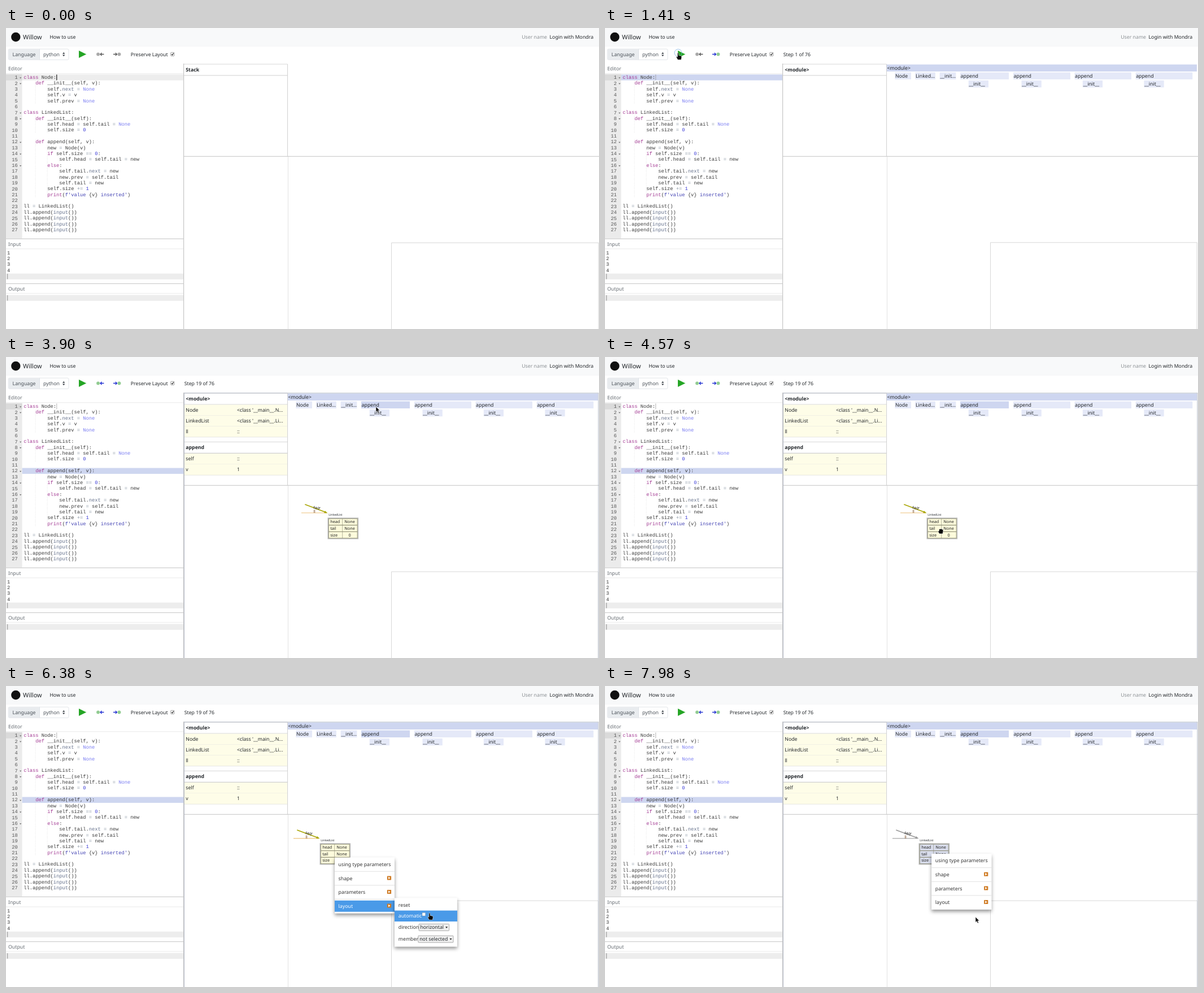
Write an HTML page that moves like this. It is 1050 by 533 pixels and loops after 8 s.

```html
<!DOCTYPE html>
<html lang="en">
<head>
<meta charset="utf-8">
<title>Program visualizer</title>
<style>
html, body { margin: 0; width: 100%; height: 100%; overflow: hidden; background: #fff; }
svg { display: block; width: 1050px; height: 533px; }
text { font-family: "Noto Sans", sans-serif; white-space: pre; text-rendering: geometricPrecision; }
.mono { font-family: "Liberation Mono", monospace; }
.bold { font-weight: 700; }
</style>
</head>
<body>
<svg id="stage" viewBox="0 0 1050 533" xmlns="http://www.w3.org/2000/svg"></svg>
<script>
const LOOP = 8000, EM = 8.75, ROW = 10.385, CODE_TOP = 82.3;
const INK = '#212529', BLUE = '#ced6f0', PALE = '#e5e9f8', EDGE = '#cfcfcf', HOT = '#4a9ae8';

const code = `class Node:
    def __init__(self, v):
        self.next = None
        self.v = v
        self.prev = None

class LinkedList:
    def __init__(self):
        self.head = self.tail = None
        self.size = 0

    def append(self, v):
        new = Node(v)
        if self.size == 0:
            self.head = self.tail = new
        else:
            self.tail.next = new
            new.prev = self.tail
            self.tail = new
        self.size += 1
        print(f'value {v} inserted')

ll = LinkedList()
ll.append(input())
ll.append(input())
ll.append(input())
ll.append(input())`.split('\n');

// ---- drawing helpers
const esc = s => String(s).replace(/&/g, '&amp;').replace(/</g, '&lt;').replace(/>/g, '&gt;');
const text = (x, mid, s, o = {}) => {
  const { size = EM, fill = INK, cls = '', more = '' } = o;
  return `<text x="${x}" y="${mid + size * .35}" font-size="${size}" fill="${fill}" class="${cls}" ${more}>${esc(s)}</text>`;
};
const bold = (x, mid, s) => text(x, mid, s, { cls: 'bold' });
const rect = (x, y, x2, y2, fill, more = '') =>
  `<rect x="${x}" y="${y}" width="${x2 - x}" height="${y2 - y}" fill="${fill}" ${more}/>`;
const line = (x, y, x2, y2, color = EDGE, w = 1, more = '') =>
  `<path d="M${x} ${y}L${x2} ${y2}" stroke="${color}" stroke-width="${w}" fill="none" ${more}/>`;
const group = (id, body, more = '') => `<g id="${id}" ${more}>${body}</g>`;

// ---- code editor
const tokenColors = ['#a33a93', '#7a7df2', '#3c3cd6', '#65718c', '#4343b4', '#8a96a4'];
const tokens = /\b(class|def|if|else|print)\b|\b(None)\b|\b(\d+)\b|\b(next|input)\b|(f'[^{]*| inserted')|([=+]+)/g;
const highlight = s => s.replace(tokens, (m, ...g) =>
  `<tspan fill="${tokenColors[g.findIndex(v => v !== undefined)]}">${m}</tspan>`);

function editor() {
  return code.map((s, i) => {
    const top = CODE_TOP + i * ROW, mid = top + 4.9;
    const indent = s.search(/\S/);
    let out = text(20.8, mid, i + 1, { fill: '#555', cls: 'mono', more: 'text-anchor="end"' });
    if (/:$/.test(s)) out += `<path d="M24 ${mid + .2}h3.4l-1.7 2z" fill="#666"/>`;
    for (let c = 4; c <= indent; c += 4)
      out += line(31.2 + c * 5.25, top, 31.2 + c * 5.25, top + ROW, '#d8d8d8', .5, 'stroke-dasharray=".6 .6"');
    return out + `<text x="31.2" y="${mid + 2.8}" font-size="${EM}" fill="#3a3a3a" class="mono">${highlight(s)}</text>`;
  }).join('');
}

const codeBand = (row, fill) => rect(28.6, CODE_TOP + (row - 1) * ROW, 314, CODE_TOP + row * ROW, fill);

function leftPane() {
  const label = (y, s) => text(4, y, s, { fill: '#666c72' });
  const band = y => rect(0, y, 314, y + 10.4, '#ededed') + line(2.7, y + .4, 2.7, y + 10, '#808080', .9);
  return label(72, 'Editor') + line(0, 80.8, 314, 80.8, '#e0e0e0', .7) +
    rect(0, 81.2, 28.6, 372.6, '#ebebeb') + rect(0, CODE_TOP, 28.6, CODE_TOP + ROW, '#dadada') +
    group('band0', codeBand(1, '#ededed')) + group('band1', codeBand(1, BLUE)) + group('band2', codeBand(12, BLUE)) +
    editor() +
    group('caretOn', line(89.8, 82.4, 89.8, 92.4, '#000', 1.1)) + group('caretOff', line(89.8, 82.4, 89.8, 92.4, '#909090', .7)) +
    line(0, 373.3, 314, 373.3, EDGE, 1.3) + label(383, 'Input') + line(0, 391, 314, 391, '#e0e0e0', .7) +
    [1, 2, 3, 4].map((n, i) => text(2, 397.5 + i * ROW, n, { cls: 'mono', fill: '#3a3a3a' })).join('') + band(434.8) +
    line(0, 452.7, 314, 452.7, EDGE, 1.3) + label(462, 'Output') + line(0, 470, 314, 470, '#e0e0e0', .7) + band(472.8);
}

// ---- top bars
const stepIcon = (x, back, arrow, dot) => {
  const a = back ? x + 7 : x, tip = back ? a : a + 6.4, d = back ? 2.6 : -2.6;
  return `<circle cx="${back ? x + 3.1 : x + 10.4}" cy="46.5" r="3" fill="${dot}"/>` +
    `<path d="M${a} 46.5h6.4M${tip + d} 43.9L${tip} 46.5L${tip + d} 49.1" stroke="${arrow}" stroke-width="1.3" fill="none"/>`;
};

function topBars() {
  return rect(0, 0, 1050, 32.4, '#f8f9fa') + line(0, 32.5, 1050, 32.5, '#f0f1f2', .5) +
    '<circle cx="17.3" cy="16" r="8.2" fill="#111"/>' +
    text(30, 16, 'Willow', { size: 10.94 }) + text(77.4, 16, 'How to use') +
    text(913.2, 16, 'User name', { fill: '#8b9094' }) + text(962.5, 16, 'Login with Mondra') +
    rect(4.3, 37.2, 111, 56.3, '#fff', 'rx="2.2" stroke="#ced4da" stroke-width=".6"') +
    rect(4.5, 37.4, 59.4, 56.1, '#e9ecef', 'rx="2"') + line(59.5, 37.3, 59.5, 56.2, '#ced4da', .6) +
    text(11.6, 46.7, 'Language', { fill: '#495057' }) + text(66, 46.7, 'python', { fill: '#495057' }) +
    '<path d="M100 45.8h4.4l-2.2-2.8zM100 47.4h4.4l-2.2 2.8z" fill="#343a40"/>' +
    '<path d="M129 40l13.2 6.4L129 52.9z" fill="#25a525"/>' +
    group('backOff', stepIcon(160, true, '#555', '#aaa')) + group('backOn', stepIcon(160, true, '#1d2cd0', '#92cc92')) +
    group('nextOff', stepIcon(190, false, '#555', '#aaa')) + group('nextOn', stepIcon(190, false, '#1d2cd0', '#92cc92')) +
    text(220.8, 46.7, 'Preserve Layout') +
    rect(291.7, 43.3, 297.9, 49.5, '#fff', 'rx=".8" stroke="#666" stroke-width=".6"') +
    '<path d="M293 46.3l1.4 1.6 2.4-3.2" stroke="#222" stroke-width="1.1" fill="none"/>' +
    group('step1', text(315.7, 46.7, 'Step 1 of 76')) + group('step19', text(315.7, 46.7, 'Step 19 of 76'));
}

// ---- right panes
const stackHead = (top, s) => line(315, top, 498.5, top, EDGE, .8) + bold(318.3, top + 9.8, s) +
  line(315, top + 20, 498.5, top + 20, EDGE, 1.1);
const stackRows = (top, rows) => rows.map(([k, v], i) => {
  const y = top + i * 19.1;
  return rect(316, y, 497.8, y + 19.1, '#fefde8') + line(316, y + 19.1, 497.8, y + 19.1, '#dedfd8', .7) +
    text(318.3, y + 9.3, k) + text(409, y + 9.3, v);
}).join('');

const call = (x, x2, row, s) => rect(x, 78.6 + row * 14.2, x2, 91 + row * 14.2, PALE) + text(x + .6, 85 + row * 14.2, s);

function callTree() {
  const appends = [[629, 715], [723, 824], [831.5, 932], [939.6, 1040.3]];
  return rect(499, 64.6, 1048, 77, BLUE) + text(499.6, 70.8, '<module>') +
    call(513.3, 542, 0, 'Node') + call(549.3, 585, 0, 'Linked...') + call(592.6, 621.4, 0, '__init...') +
    appends.map(([a, b]) => call(a, b, 0, 'append')).join('') +
    group('appendHot', rect(629, 78.6, 715, 91, BLUE) + text(629.6, 85, 'append')) +
    [643.7, 737.5, 845.8, 954.4].map(x => call(x, x + 35.3, 1, '__init__')).join('');
}

const canvasBox = (y, x2) => `<path d="M682.5 533V${y}H${x2}V533" stroke="#d4d4d4" stroke-width=".9" fill="none"/>`;
const outline = (id, x, x2) => group(id, rect(x, 78.7, x2, 91, 'none', 'stroke="#666" stroke-width=".6" stroke-dasharray="1 .6"'));

function rightPane() {
  return line(314.6, 63, 314.6, 533, '#c6c6c6', 1.2) + line(498.6, 64, 498.6, 227, EDGE, 1) +
    line(315, 227.4, 1050, 227.4, EDGE, 1.2) + line(499.5, 228, 499.5, 533, '#dedede', .9) +
    group('stack0', stackHead(64, 'Stack') + canvasBox(380.4, 1049.2)) +
    group('stack1', stackHead(64, '<module>') + canvasBox(379.9, 1048.2)) +
    group('stack2', stackHead(64, '<module>') +
      stackRows(84.5, [['Node', "<class '__main__.N..."], ['LinkedList', "<class '__main__.Li..."], ['ll', '::']]) +
      stackHead(150.4, 'append') + stackRows(171, [['self', '::'], ['v', '1']]) + canvasBox(380.2, 1048.6)) +
    group('calls', callTree()) +
    group('focus', rect(315.4, 63.9, 1048.9, 540, 'none', 'stroke="#b4bac6"')) +
    outline('hoverInit', 592.8, 621.3) + outline('hoverAppend', 629.2, 714.9) +
    group('tip', rect(620, 97, 652, 109.2, '#4b4b4b', 'rx="1"') + text(624, 102.8, '__init__', { size: 7.2, fill: '#ddd' }));
}

// ---- object graph
function node(id, fill, selfColor, refColor) {
  const small = (x, y, s, more = '') => text(x, y, s, { size: 7.25, fill: '#222', more });
  const rows = [['head', 'None'], ['tail', 'None'], ['size', '0']];
  const grid = '#8a8a72';
  return group(id,
    line(523, 276, 567, 276, refColor, 1.1) +
    line(529.3, 261, 567, 275.2, selfColor, 1.6) +
    `<path d="M569.5 276.4l-6.3-.2 1.7-4z" fill="${selfColor}"/>` +
    small(550, 267, 'self', 'text-anchor="middle" transform="rotate(18 550 267)"') +
    text(546, 273.2, 'll', { size: 7.25, fill: '#7a4a20', more: 'text-anchor="middle"' }) +
    text(571.3, 279.7, 'LinkedList', { size: 5.1 }) +
    rect(570.3, 285.3, 623.3, 321.7, fill, 'stroke="#b8b8b8" stroke-width="1.6"') +
    rows.map(([k, v], i) => {
      const y = 286.3 + i * 11.6;
      return rect(571.5, y, 622.1, y + 11.3, fill, `stroke="${grid}" stroke-width=".8"`) +
        small(574.2, y + 5.5, k) + small(608.6, y + 5.5, v, 'text-anchor="middle"');
    }).join('') + line(595.7, 286.3, 595.7, 321, grid, .6));
}

// ---- context menu
const boxed = (x, y, x2, y2) => rect(x, y, x2, y2, '#fff', 'filter="url(#shade)"');

function menu() {
  const item = (s, i) => {
    const mid = 316 + i * 24.6;
    return group('hot' + i, rect(582, mid - 10, 688, mid + 10, HOT)) +
      (i ? line(582, mid - 12.3, 688, mid - 12.3, '#d5d5d5', .7) : '') +
      text(588.6, mid, s, { fill: '#333', more: `id="label${i}"` }) +
      (i ? rect(674.9, mid - 4.2, 682.1, mid + 2.8, '#cf7a22', 'rx=".6"') +
        `<path d="M677 ${mid - 2.9}l3.6 2.2-3.6 2.2z" fill="#fff"/>` : '');
  };
  const select = (x, x2, mid, s) => rect(x, mid - 6, x2, mid + 6, '#efefef', 'rx="1" stroke="#777" stroke-width=".6"') +
    text(x + 2.4, mid, s) + `<path d="M${x2 - 6.5} ${mid - 1.2}h4l-2 2.8z" fill="#222"/>`;
  const sub = boxed(688, 375.5, 799, 461.3) + text(694.8, 388, 'reset', { fill: '#333' }) +
    group('autoHot', rect(688, 397.6, 799, 417, HOT)) +
    text(694.8, 407.4, 'automatic', { fill: '#333', more: 'id="autoLabel"' }) +
    rect(737, 401.5, 742.6, 407, '#fff', 'rx=".7" stroke="#888" stroke-width=".4"') +
    text(694.8, 427.4, 'direction', { fill: '#333' }) + select(731, 784.6, 427.4, 'horizontal') +
    text(694.8, 448, 'member', { fill: '#333' }) + select(729.8, 792, 448.2, 'not selected');
  return group('menu', boxed(582, 303.7, 688, 402.4) +
    ['using type parameters', 'shape', 'parameters', 'layout'].map(item).join('') + group('sub', sub));
}

// ---- pointer
const pointer = group('pointer', [
  group('arrow', '<path d="M0 0V9.4L2.2 7.4 3.8 11 5.5 10.3 3.9 6.8H6.8Z"/>'),
  group('hand', '<path d="M-1.1 .6Q0-.6 1.1 .6V4.4L5 5.2Q6.4 5.7 6.2 7.5L5.4 12.2H-.6L-3.1 8Q-3.5 6.4-2.2 6.5L-1.1 7.5Z"/>'),
  group('fist', '<path d="M-3-3Q-2-4.6-.5-3.8Q1-4.8 2-3.6Q4.6-3.6 4.4-.5L3.4 4.4H-2.4L-4.4 1.2Q-4.8-.8-3-.6Z"/>')
].join(''), 'fill="#0a0a0a" stroke="#fff" stroke-width=".5"');

const stage = document.getElementById('stage');
stage.innerHTML = '<defs><filter id="shade" x="-15%" y="-15%" width="130%" height="135%">' +
  '<feDropShadow dx="0" dy="3.6" stdDeviation="3" flood-color="#000" flood-opacity=".42"/></filter></defs>' +
  topBars() + leftPane() + rightPane() +
  group('graph', node('plain', '#fdfbdc', '#a8a500', '#edc27a') + node('grey', '#d9ddec', '#9a9a9a', '#a8a8a8')) +
  menu() + '<circle id="ripple" fill="none" stroke="#78aee0" stroke-width="1"/>' + pointer;

// ---- timeline
const RUN = 1360, JUMP = 3740, MENU = 5450, SUB = 5780, CLOSE = 6590, GREY = 6970, MENU2 = 7790;
const el = {};
stage.querySelectorAll('[id]').forEach(e => el[e.id] = e);
const within = (t, a, b = LOOP) => t >= a && t < b;

// start, end, from, bend, to
const moves = [
  [460, 1240, [310, 531], [270, 160], [129.5, 44]],
  [1820, 2610, [129.5, 44], [400, 145], [613, 88]],
  [3210, 3480, [613, 88], [634, 92], [655, 88]],
  [3950, 4470, [655, 88], [640, 220], [594.5, 308.5]],
  [4600, 4800, [594.5, 308.5], [587, 306], [580.5, 302.4]],
  [5450, 5520, [580.5, 302.4], [582, 315], [586.6, 331.5]],
  [5520, 5820, [586.6, 331.5], [600, 365], [626, 388]],
  [5890, 6370, [626, 388], [690, 392], [750, 402]],
  [6920, 7450, [750, 402], [680, 330], [577.5, 296.5]],
  [7800, 7970, [577.5, 296.5], [610, 360], [656, 409]]
];
const clicks = [1300, 3690, 5350, 6430, 7690];
const kinds = [[0, 'arrow'], [1180, 'hand'], [1880, 'arrow'], [4430, 'fist'], [MENU, 'hand'],
  [CLOSE, 'arrow'], [7400, 'fist'], [MENU2, 'hand'], [7940, 'arrow']];

function pointerAt(t) {
  const [a, b, p, q, r] = moves.filter(m => m[0] <= t).pop() || moves[0];
  const u = Math.max(0, Math.min(1, (t - a) / (b - a))), s = u * u * (3 - 2 * u);
  return [0, 1].map(i => p[i] * (1 - s) ** 2 + 2 * q[i] * s * (1 - s) + r[i] * s * s);
}

function render(t) {
  const show = (id, on) => el[id].style.display = on ? '' : 'none';
  const ran = t >= RUN, jumped = t >= JUMP;
  ['band0', 'stack0', 'nextOff'].forEach(id => show(id, !ran));
  ['band1', 'stack1', 'step1'].forEach(id => show(id, ran && !jumped));
  ['band2', 'stack2', 'step19', 'backOn', 'appendHot', 'graph', 'focus'].forEach(id => show(id, jumped));
  show('backOff', !jumped);
  show('nextOn', ran);
  show('calls', ran);
  show('caretOn', t < 1300 && !within(t, 460, 960));
  show('caretOff', t >= 1300);
  show('hoverInit', within(t, 2610, 3260));
  show('hoverAppend', within(t, 3320, JUMP));
  show('tip', within(t, 3160, 3240));

  const drag = pointerAt(Math.max(4570, Math.min(t, 4800)));
  el.graph.setAttribute('transform', `translate(${drag[0] - 594.5} ${drag[1] - 308.5})`);
  show('plain', t < GREY);
  show('grey', t >= GREY);

  const again = t >= MENU2;
  show('menu', within(t, MENU, CLOSE) || again);
  el.menu.setAttribute('transform', again ? 'translate(-3.8 -6.6)' : '');
  const [x, y] = pointerAt(t);
  const slide = again ? 6.6 : 0;
  let hot = Math.floor((y + slide - 303.7) / 24.6);
  if (t < 5560) hot = 0;
  else if (within(t, SUB, CLOSE)) hot = 3;
  for (let i = 0; i < 4; i++) {
    show('hot' + i, i === hot);
    el['label' + i].setAttribute('fill', i === hot ? '#fff' : '#333');
  }
  show('sub', within(t, SUB, CLOSE));
  const auto = x > 688 && y > 397;
  show('autoHot', auto);
  el.autoLabel.setAttribute('fill', auto ? '#fff' : '#333');

  show('pointer', t >= 460);
  el.pointer.setAttribute('transform', `translate(${x} ${y})`);
  const kind = kinds.filter(k => k[0] <= t).pop()[1];
  ['arrow', 'hand', 'fist'].forEach(id => show(id, id === kind));

  const start = clicks.find(c => within(t, c, c + 210));
  show('ripple', start !== undefined);
  if (start !== undefined) {
    const at = pointerAt(start), age = t - start;
    el.ripple.setAttribute('cx', at[0]);
    el.ripple.setAttribute('cy', at[1]);
    el.ripple.setAttribute('r', 2 + 4.5 * Math.min(1, age / 110));
    el.ripple.setAttribute('opacity', 1 - age / 420);
  }
}

const begin = performance.now();
function tick() {
  render((performance.now() - begin) % LOOP);
  requestAnimationFrame(tick);
}
tick();
</script>
</body>
</html>
```
